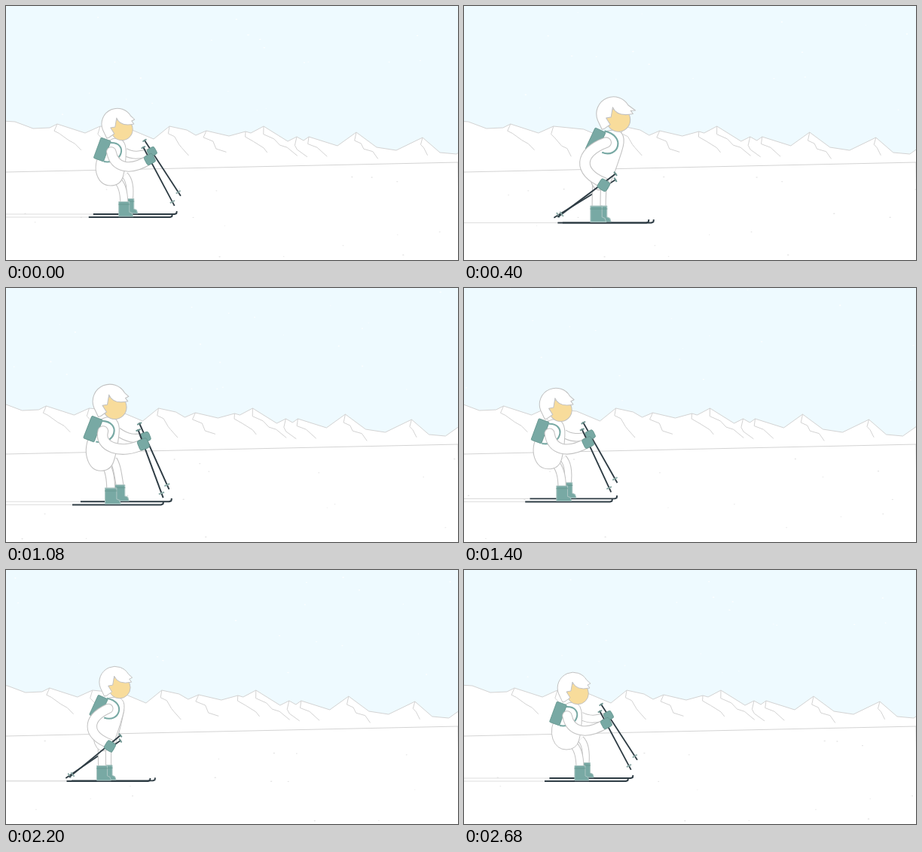
An HTML page with a canvas for the animation above (2.72 s loop, 600 by 338 pixels).

```html
<!DOCTYPE html>
<html lang="en">
<head>
<meta charset="utf-8">
<title>Skier</title>
<style>
html, body { margin: 0; width: 100%; height: 100%; overflow: hidden; background: #fff; }
canvas { display: block; width: 600px; height: 338px; }
</style>
</head>
<body>
<canvas id="stage" width="600" height="338"></canvas>
<script>
const ctx = document.getElementById('stage').getContext('2d');
const LOOP = 2720, STROKE = LOOP / 2, W = 600, H = 338;
const SKY = '#eefaff', TEAL = '#78a9a4', EDGE = '#65968f', DARK = '#2e3c44', SKIN = '#f8dc9b';
const LINE = '#c2c2c2', RIDGE_LINE = '#d3d3d3';

let seed = 11;
const rand = () => (seed = seed * 16807 % 2147483647) / 2147483647;
const span = (t, a, b) => Math.max(0, Math.min(1, (t - a) / (b - a)));
const ease = (t, a, b) => { const u = span(t, a, b); return u * u * (3 - 2 * u); };
const mix = (a, b, k) => a.map((v, i) => v + (b[i] - v) * k);

// Two pole strokes fill one loop; the skier drifts nearer and back once
function pose(t) {
  const p = t % STROKE;
  const lift = 8 * (ease(p, 0, 360) - ease(p, 340, 420));
  const near = 62 + lift + 80 * ease(p, 0, 360) - 72 * ease(p, 820, 1080) - 8 * ease(p, 1060, 1300);
  const up = (near - 62) / 80;
  const rise = ease(t < 420 ? t + LOOP : t, 2140, 3140);
  const fall = t < 420 ? 0 : (1 - span(t, 420, 1720)) ** 2;
  return {
    x: 120 + 48 * (rise + fall),
    y: 281 + 7.5 * (ease(t, 0, 400) - ease(t, 1080, 1700)),
    crouch: 1 - ease(p, 0, 360) + ease(p, 720, 1260),
    near,
    far: near - 5 + 10 * up,
    reach: 1 - Math.min(1, up),
    lead: 4 * Math.sin(Math.PI * span(p, 820, 1340)),
    blow: 4 * (ease(p, 0, 340) - ease(p, 340, 660))
  };
}

function pan(t) {
  let d = Math.abs(t - 1420);
  d = Math.min(d, LOOP - d) / STROKE;
  return 17 * d ** 2.1 - 15.5;
}

const ridge = ('-5,153 12,154 36,163 58,162 68,157 105,169 125,160 165,164 196,177 217,160 240,165 '
  + '252,172 266,166 296,173 318,167 325,169 342,160 374,180 386,174 395,179 402,174 440,186 '
  + '465,168 492,188 518,192 553,175 576,195 598,197 622,180')
  .split(' ').map(s => s.split(',').map(Number));

// A jagged crease runs down from every peak
const folds = ridge.slice(1, -1).filter(([, y], i) => y < ridge[i][1] && y < ridge[i + 2][1])
  .map(([x, y]) => {
    const pts = [[x, y]];
    for (let i = 0; y < 194 && i < 5; i++) {
      x += i ? 3 + rand() * 11 : -4 + rand() * 4;
      y += i % 2 ? 3 + rand() * 4 : 7 + rand() * 5;
      pts.push([x, y]);
    }
    return pts;
  });

const specks = Array.from({ length: 40 }, (_, i) => ({
  sky: i < 22, x: rand() * 660, y: rand(), r: .4 + rand() * .4, turns: 1 + i % 2
}));

function trace(points) {
  ctx.beginPath();
  points.forEach(p => ctx.lineTo(...p));
}
function ink(color, width) {
  ctx.strokeStyle = color;
  ctx.lineWidth = width;
  ctx.stroke();
}
function paint(fill, color = LINE, width = 1) {
  ctx.fillStyle = fill;
  ctx.fill();
  ink(color, width);
}
function line(color, width, ...points) {
  trace(points);
  ink(color, width);
}
function cubic(p) {
  ctx.beginPath();
  ctx.moveTo(p[0], p[1]);
  ctx.bezierCurveTo(...p.slice(2));
}
// Closed soft shape inside a polygon of control points
function blob(p) {
  const n = p.length;
  ctx.beginPath();
  for (let i = 0; i <= n; i += 2) {
    const [x, y, nx, ny] = [0, 1, 2, 3].map(j => p[(i + j) % n]);
    const mid = [(x + nx) / 2, (y + ny) / 2];
    if (i) ctx.quadraticCurveTo(x, y, ...mid); else ctx.moveTo(...mid);
  }
}
function limb(p, width) {
  cubic(p);
  ink(LINE, width + 2);
  ink('#fff', width);
}
function at(x, y, angle, draw) {
  ctx.save();
  ctx.translate(x, y);
  ctx.rotate(angle * Math.PI / 180);
  draw();
  ctx.restore();
}

function drawScene(t) {
  ctx.fillStyle = SKY;
  ctx.fillRect(0, 0, W, H);
  at(pan(t), 0, 0, () => {
    trace([...ridge, [W + 30, H], [-5, H]]);
    ctx.fillStyle = '#fff';
    ctx.fill();
    for (const f of [ridge, ...folds]) line(RIDGE_LINE, 1, ...f);
  });
  trace([[0, 221], [W, 208], [W + 2, H + 2], [-2, H + 2]]);
  paint('#fff', RIDGE_LINE);
  for (const s of specks) {
    const x = (s.x + s.turns * 660 * (1 - t / LOOP)) % 660 - 30;
    const y = s.sky ? (s.y + t / LOOP) % 1 * 150 : 226 + s.y * 108;
    ctx.fillStyle = s.sky ? '#fff' : '#e4e4e4';
    ctx.beginPath();
    ctx.ellipse(x, y, s.r * 1.7, s.r, 0, 0, 7);
    ctx.fill();
  }
}

function ski(x, y) {
  at(x, y, 0, () => {
    line('#dedede', 1, [-400, 0], [-40, 0]);
    line(DARK, 1.9, [-40, 0], [68, 0], [70.5, -1], [71, -4]);
  });
}
function boot(x, y) {
  at(x, y, 0, () => {
    trace([[0, -20.5], [14, -20.5], [14, -7], [17.5, -5.5], [19, -1], [0, -1]]);
    ctx.closePath();
    paint(TEAL, '#a9c4c1', 1);
    line(EDGE, .8, [-.5, -17], [14.5, -17]);
  });
}
function pole(x, y, angle) {
  at(x, y, angle, () => {
    line(DARK, 1.8, [-19, 0], [70, 0]);
    line('#6d9591', 1.8, [-18, -3], [-18, 3]);
    line('#8caaa7', 1.8, [64, -3.5], [64, 3.5]);
  });
}
function box(x, y, angle, w, h, r) {
  at(x, y, angle, () => {
    ctx.beginPath();
    ctx.roundRect(-w / 2, -h / 2, w, h, r);
    paint(TEAL, EDGE, .8);
  });
}
function head(x, y, blow) {
  at(x, y, 0, () => {
    ctx.beginPath();
    ctx.arc(6, 7.3, 14.4, 0, 7);
    paint(SKIN);
    ctx.beginPath();
    ctx.moveTo(-14, 19);
    ctx.arc(0, 0, 20.8, 2.75, 5.75);
    ctx.lineTo(23 + blow, -6 + blow / 2);
    ctx.lineTo(19 + blow / 2, -4);
    ctx.lineTo(22 + blow / 2, 0);
    ctx.quadraticCurveTo(4, 4, -1, -8);
    for (const p of [[-3, 4], [-9, 5], [-4, 13], [-11, 18]]) ctx.lineTo(...p);
    ctx.closePath();
    paint('#fff');
  });
}

function drawSkier(t) {
  const { x, y, crouch, near, far, reach, lead, blow } = pose(t);
  const scale = 1 + (y - 281) * .012;
  const body = (up, low) => mix(up, low, crouch);
  const arm = (up, low) => mix(up, low, reach).map((v, i) => i % 2 ? v : v + lead * 2);
  const farHand = arm([15, -43], [44, -87]), nearHand = arm([16, -49], [41, -77]);
  const turn = 32 - 60 * reach;
  const farX = 6 + lead, farY = -4 * Math.min(1, crouch * 1.3);

  ctx.save();
  ctx.translate(x, y);
  ctx.scale(scale, scale);
  ctx.lineJoin = 'round';

  limb([...body([35, -97], [8, -87]), ...arm([27, -80, 24, -60], [18, -81, 28, -82]), ...farHand], 9);
  pole(...farHand, far);
  box(...farHand, turn, 11, 11, 2.5);

  ski(farX, farY);
  limb([...body([16, -52, 15, -45, 14, -35], [8, -56, 14, -50, 16, -40]), farX + 8, farY - 19], 8);
  boot(farX, farY);
  ski(0, 0);
  limb([...body([8, -50, 7, -42], [-3, -50, 4, -44]), 7, -32, 7, -18], 9);
  boot(0, 0);

  blob(body([12, -114, -4, -74, 2, -40, 20, -40, 30, -62, 46, -112],
    [-14, -106, -34, -70, -24, -42, 2, -42, 9, -66, 10, -104]));
  paint('#fff');
  box(...body([6, -100, 25], [-22, -90, 20]), 14, 29, 1);
  cubic(body([17, -112, 44, -106, 34, -78, 14, -86], [-11, -99, 12, -100, 6, -70, -20, -74]));
  ink(TEAL, 2);
  head(...body([28, -133], [-2, -124]), blow);

  ctx.lineCap = 'round';
  limb([...body([19, -98, -14, -86], [-10, -87, -6, -66]), ...arm([-16, -62], [14, -60]), ...nearHand], 11.5);
  ctx.lineCap = 'butt';
  pole(...nearHand, near);
  box(nearHand[0], nearHand[1] + 3 - 3 * reach, turn, 12.5, 12.5, 2.5);
  ctx.restore();
}

function frame(now) {
  const t = now % LOOP;
  drawScene(t);
  drawSkier(t);
  requestAnimationFrame(frame);
}
requestAnimationFrame(frame);
</script>
</body>
</html>
```
